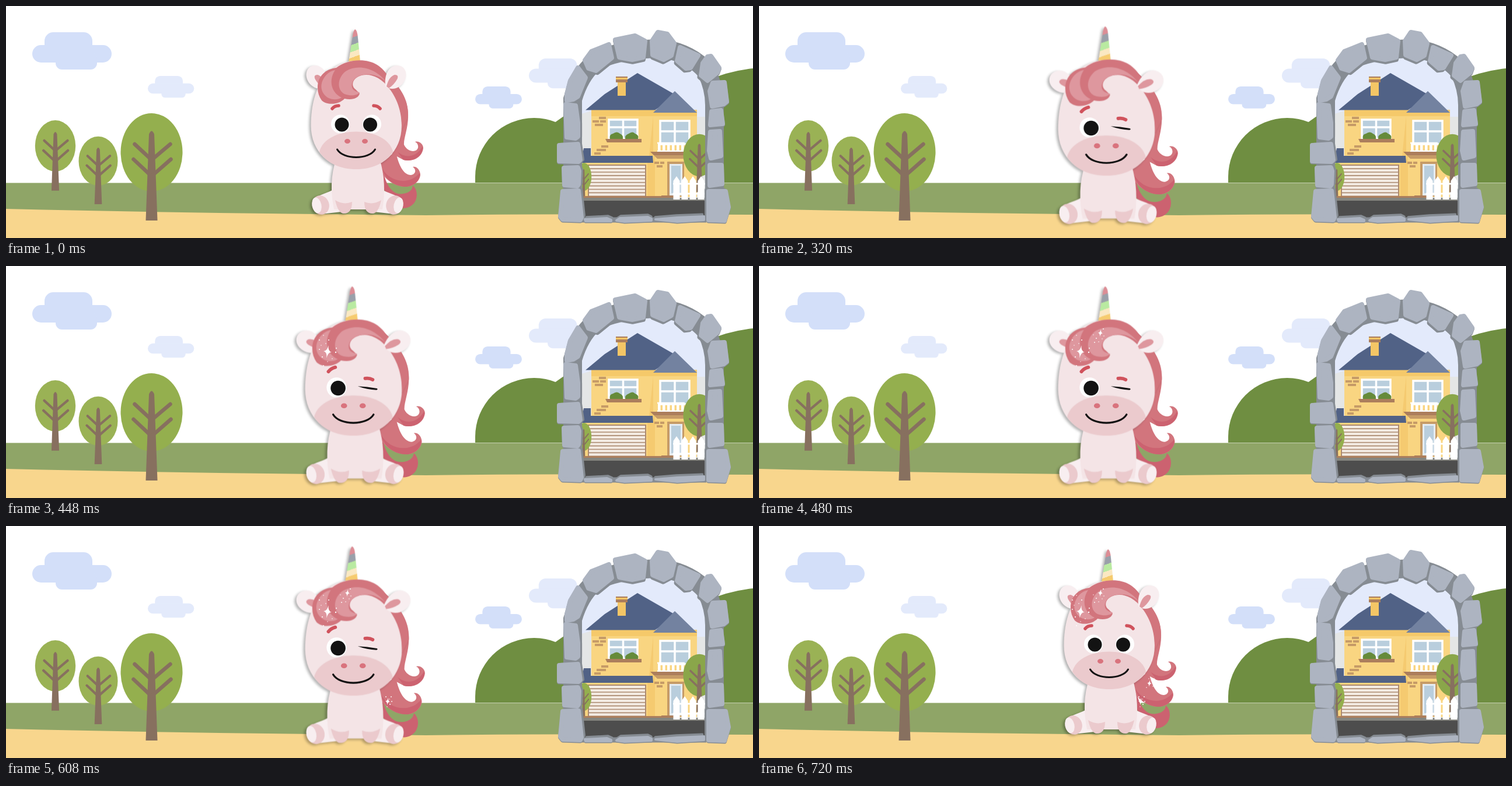
An HTML page that plays this animation: 1280 px wide and 398 px high, repeating every 0.76 s.

```html
<!DOCTYPE html>
<html lang="en">
<head>
<meta charset="utf-8">
<title>Winking unicorn</title>
<style>
  html, body { margin: 0; width: 100%; height: 100%; overflow: hidden; background: #fff; }
  svg { display: block; width: 100%; height: 100%; }
  #front { filter: drop-shadow(-2.5px 2px 2px rgba(0, 0, 0, .3)); }
  .skin { fill: #f4e4e6; }
  .pale { fill: #f8eef0; }
  .blush { fill: #ebcacd; }
  .hair { fill: #d2757d; }
  .hairLight { fill: #de979e; }
  .hairDark { fill: #cc6270; }
  .brow { fill: none; stroke: #d0525c; stroke-width: 5.5; stroke-linecap: round; }
  .roof { fill: #516286; }
  .brick { fill: #c69b67; }
  .wood { fill: #ac7e5c; }
  .glass { fill: #b9cedd; stroke: #fff; stroke-width: 3.5; }
  .stoneShade { fill: #868c93; stroke: #868c93; }
  #sparkles { fill: #fff; }
</style>
</head>
<body>
<svg viewBox="0 0 1280 398" preserveAspectRatio="none">
  <defs>
    <g id="cloud">
      <rect x="21" width="82" height="40" rx="15"/>
      <rect y="22" width="136" height="30" rx="15"/>
      <rect x="40" y="35" width="71" height="29" rx="11"/>
    </g>
    <g id="tree">
      <ellipse rx="53" ry="67"/>
      <path d="M-4.500-31Q0-42 4.500-31L10 117H-10Z" fill="#87705f"/>
      <path d="M-29-14L0 13L32-14M-31 12L0 41L33 12" fill="none" stroke="#87705f" stroke-width="6.500" stroke-linecap="round"/>
    </g>
    <g id="stones" stroke-width="8" stroke-linejoin="round">
      <path d="M1044 58L1078 51L1095 60L1092 88L1073 92L1051 88Z"/>
      <path d="M1107 60L1117 45L1133 48L1145 64L1140 85L1127 92L1108 84Z"/>
      <path d="M992 93L1003 78L1033 66L1038 89L1011 111L998 107Z"/>
      <path d="M1155 71L1186 85L1173 106L1165 107L1150 94Z"/>
      <path d="M1194 98L1202 87L1208 86L1222 106L1219 114L1202 128L1191 119Z"/>
      <path d="M961 151L967 128L980 106L993 123L980 155L972 160L961 162Z"/>
      <path d="M1206 146L1211 132L1231 131L1235 164L1230 168L1210 172Z"/>
      <path d="M959 169L976 171L980 200L980 224L976 227L961 225Z"/>
      <path d="M1209 181L1225 179L1228 202L1207 204Z"/>
      <path d="M1207 216L1223 215L1225 257L1208 261L1205 248Z"/>
      <path d="M948 239L980 237L984 264L981 267L948 266Z"/>
      <path d="M956 278L980 277L982 283L981 306L979 309L957 307Z"/>
      <path d="M1206 273L1226 273L1227 305L1206 308Z"/>
      <path d="M954 318L981 317L986 363L984 367L954 366L950 361Z"/>
      <path d="M1204 318L1233 318L1238 345L1231 368L1204 367Z"/>
      <g stroke-width="4">
        <path d="M992 366L1030 364L1037 367V369H993Z"/>
        <path d="M1046 368L1052 364L1100 362L1106 365V368L1060 370Z"/>
        <path d="M1113 366L1150 363L1196 361V367L1150 370Z"/>
      </g>
    </g>
    <path id="picket" d="M0 332V300L5.500 292L11 300V332Z" fill="#fff"/>
    <path id="star" d="M0-11Q.6-.6 7 0Q.6.6 0 11Q-.6.6-7 0Q-.6-.6 0-11Z"/>
    <g id="ear">
      <path class="pale" d="M650 138C648 118 655 103 670 102C684 102 689 116 683 128C677 140 662 147 650 138Z"/>
      <path class="hairLight" d="M652 138Q656 121 666 118Q674 118 670 126Q665 135 656 141Z"/>
    </g>
    <g id="limbs">
      <path class="pale" d="M562 314C552 321 537 323 530 330L540 357L575 353Z"/>
      <ellipse class="blush" cx="539" cy="341.500" rx="14.500" ry="16.500" transform="rotate(-18 539 341)"/>
      <ellipse class="pale" cx="532.500" cy="342" rx="8" ry="13.500" transform="rotate(-12 532 342)"/>
    </g>
    <path id="hoof" class="blush" d="M564 333Q578 342 593 336Q593 356 579 356Q569 356 564 333Z"/>
    <linearGradient id="stripes" gradientUnits="userSpaceOnUse" x1="592" y1="42" x2="609.800" y2="93">
      <stop offset=".222" stop-color="#dc8d95"/>
      <stop offset=".222" stop-color="#9aa0aa"/><stop offset=".433" stop-color="#9aa0aa"/>
      <stop offset=".433" stop-color="#b9eaa1"/><stop offset=".643" stop-color="#b9eaa1"/>
      <stop offset=".643" stop-color="#fae8c2"/><stop offset=".817" stop-color="#fae8c2"/>
      <stop offset=".817" stop-color="#f6cb6f"/>
    </linearGradient>
    <clipPath id="gate"><path d="M975 366V180C975 115 1025 80 1095 80S1212 115 1212 190V366Z"/></clipPath>
  </defs>

  <!-- Landscape -->
  <g fill="#d3dff9">
    <use href="#cloud" x="45" y="45"/>
    <use href="#cloud" transform="translate(804 138) scale(.588)"/>
  </g>
  <g fill="#e3eafb">
    <use href="#cloud" transform="translate(243 120) scale(.583)"/>
    <use href="#cloud" transform="translate(896 90) scale(.8)"/>
  </g>
  <g fill="#6f8e41">
    <path d="M804 303V293A101 101 0 0 1 1006 293V303Z"/>
    <path d="M920 303V216Q940 199 965 183V303ZM1195 303V130Q1238 111 1280 107V303Z"/>
  </g>
  <path d="M0 303.500H1280V398H0Z" fill="#8fa567"/>
  <path d="M0 348Q300 355 620 358L720 359Q900 356 1280 358V398H0Z" fill="#f8d68d"/>
  <g fill="#9ab255">
    <use href="#tree" transform="translate(84.500 240) scale(.655)"/>
    <use href="#tree" transform="translate(158 266) scale(.632)"/>
    <use href="#tree" transform="translate(249.500 251)" fill="#94af4e"/>
  </g>

  <!-- House behind the gate -->
  <g clip-path="url(#gate)">
    <path d="M970 75H1215V370H970Z" fill="#e3eafb"/>
    <path d="M970 190L1003 180V330H970ZM1184 190H1215V330H1184Z" fill="#e4e6e6"/>
    <path d="M1003 178H1184V328H990V262H1003Z" fill="#f9d581"/>
    <path d="M1003 178H1184V189H1003Z" fill="#f5c96a"/>
    <path d="M1109 189L1102 257H1112V328H1099V268H1109Z" fill="#f5ca70"/>
    <path class="roof" d="M993 178.500L1026 151L1082 115L1150 154L1112 178.500Z"/>
    <path d="M1109 183L1146 146L1184 183Z" fill="#7382a0"/>
    <path d="M1048 128H1062V154H1048Z" fill="#f4c666"/>
    <path class="wood" d="M1045 121H1065V131H1045Z"/>
    <path d="M1045 123H1065V126H1045Z" fill="#f4c666"/>
    <path class="brick" d="M1016 190h12v4h-12zM1005 196h11v4h-11zM1018 196h10v4h-10zM1009 202h14v4h-14zM1020 239h12v4h-12zM1012 245h16v4h-16zM1008 251h11v4h-11zM1111 267h8v4h-8zM1121 267h7v4h-7zM1115 273h10v4h-10z"/>
    <path class="roof" d="M985 269L990 244H1002V257H1108L1109 269Z"/>

    <path class="glass" d="M1033 195H1082V228H1033ZM1057.500 195V228M1033 208H1082"/>
    <path d="M1035 229Q1033 220 1040 219Q1047 214 1052 219Q1058 221 1057 229ZM1061 229Q1060 221 1067 219Q1074 214 1078 219Q1085 221 1083 229Z" fill="#668b3a"/>
    <path class="wood" d="M1027 228H1089V234H1030Z"/>
    <path class="glass" d="M1121 197H1171V237H1121ZM1146 197V237M1121 215H1171"/>
    <path d="M1116 235H1163M1116 249H1163" stroke="#fff" stroke-width="2.500"/>
    <path d="M1117 242H1163" stroke="#fff" stroke-width="14" stroke-dasharray="4.500 3.500"/>
    <path class="wood" d="M1104 250H1164V256H1110Z"/>
    <path class="brick" d="M1110 256H1164V262H1116Z"/>

    <path d="M997 272H1097V327H997Z" fill="#ac8a70"/>
    <path d="M1047 274V326" stroke="#f3ebe3" stroke-width="96" stroke-dasharray="4.300 1.600"/>
    <path class="brick" d="M1133 267H1162V327H1133Z"/>
    <path d="M1137 271H1159V325H1137Z" fill="#e6edf2"/>
    <path d="M1140 274H1156V321H1140Z" fill="#b9cedd"/>
    <use href="#tree" transform="translate(1188 256) scale(.52 .54)" fill="#8aa64a"/>
    <use href="#tree" transform="translate(990 293) scale(.25 .36)" fill="#94af4e"/>
    <path class="wood" d="M990 326H1145V329H990ZM1123 325H1148V333H1123Z"/>
    <path d="M985 329H1205V335H985Z" fill="#85857f"/>
    <path d="M985 334H1205V368H985Z" fill="#4d4d4d"/>
    <path d="M1143 305H1198M1143 322H1198" stroke="#fff" stroke-width="3"/>
    <use href="#picket" x="1143.500"/><use href="#picket" x="1157.500"/>
    <use href="#picket" x="1171.500"/><use href="#picket" x="1185.500"/>
  </g>
  <g class="stoneShade">
    <path d="M971 368V160Q985 112 1015 92Q1060 73 1126 73Q1175 82 1200 112Q1214 140 1214 170V368" fill="none" stroke-width="32"/>
    <path d="M985 367H1200" stroke-width="9"/>
    <use href="#stones" transform="translate(1095 230) scale(.972) translate(-1095 -230)"/>
    <use href="#stones" y="1.500"/>
  </g>
  <use href="#stones" fill="#adb4c1" stroke="#adb4c1"/>

  <g id="unicorn">
    <!-- Mane -->
    <path class="hairDark" d="M645 275C648 300 658 319 672 322C684 324 697 318 697 308C705 314 706 328 700 337C695 344 687 347 680 347C668 332 655 322 648 316Z"/>
    <path class="hair" d="M636 270L668 250C672 270 680 290 694 290C703 288 703 280 697 276C704 274 710 282 710 290C708 304 694 311 683 310C670 310 656 302 648 292Z"/>
    <path class="hairDark" d="M644 278C658 303 692 308 709 286C711 301 695 311 683 310C664 308 650 298 644 278Z"/>
    <path class="hair" d="M645 110C676 138 690 160 689 190C689 210 681 228 682 238C688 251 704 252 706 243C707 237 703 234 701 233C708 231 715 237 715 244C713 260 697 268 681 264L655 250Z"/>
    <path class="hairDark" d="M671 250C684 262 704 260 714 240C716 258 697 268 681 264Z"/>

    <g id="front">
      <use href="#limbs"/>
      <use href="#limbs" transform="matrix(-1 0 0 1 1205 0)"/>
      <path class="skin" d="M566 262C556 290 556 320 562 349H645C650 320 649 290 640 262Z"/>
      <use href="#hoof"/>
      <use href="#hoof" transform="matrix(-1 0 0 1 1207 0)"/>
      <path d="M598 40Q602 41 603 55L607 96H587L594 52Q595 42 598 40Z" fill="url(#stripes)"/>
      <g transform="matrix(-1 0 0 1 1200 0)"><use class="ear" href="#ear"/></g>
      <path class="skin" d="M600 94C645 94 678 135 678 205C678 250 645 280 600 280C555 280 522.500 250 522.500 205C522.500 135 555 94 600 94Z"/>
      <path class="blush" d="M537 250C548 204 652 204 663 250C650 270 627 280 600 280S550 270 537 250Z"/>
      <path class="hair" d="M645 110C676 138 690 160 689 190L678 212C679 180 669 156 654 138Z"/>
      <path class="hair" d="M534 140C534 120 548 108 566 106C585 91 617 89 636 101C652 111 662 130 658 143C640 118 618 114 604 121C592 127 592 138 599 143L606 150C604 158 594 162 580 159C572 168 552 172 541 162Q534 152 534 140Z"/>
      <path class="hairLight" d="M652 131C635 108 605 98 582 112C567 124 567 144 580 151C594 156 604 152 606 148C594 147 590 139 594 130C600 116 632 110 652 131Z"/>
      <path class="hairLight" d="M549 118C536 132 538 150 553 158C562 162 571 160 575 157C556 148 553 126 564 110Q556 111 549 118Z"/>
      <use class="ear" href="#ear"/>
    </g>

    <!-- Face -->
    <circle cx="573" cy="202.500" r="16" fill="#fff"/>
    <circle cx="575.500" cy="203.500" r="12" fill="#131313"/>
    <g id="openEye">
      <circle cx="627" cy="202.500" r="16" fill="#fff"/>
      <circle cx="624" cy="203.500" r="12" fill="#131313"/>
      <path class="brow" d="M559 176Q563 171 570 171M630 171Q637 171 641 176"/>
    </g>
    <g id="closedEye">
      <path d="M607 200.500Q622 201 638 204Q640 206 637 206.500Q622 206 607 200.500Z" fill="#131313"/>
      <path class="brow" d="M560 177Q564 172 571 170M619 188Q626 187 631 190"/>
    </g>
    <path d="M580 232a5 4 0 1 0 10 0a5 4 0 1 0-10 0M610 232a5 4 0 1 0 10 0a5 4 0 1 0-10 0" fill="#d9737d"/>
    <path d="M567.500 246C578 264 622 264 632.500 246" fill="none" stroke="#111" stroke-width="3" stroke-linecap="round"/>
  </g>
  <g id="sparkles"></g>
</svg>

<script>
  const LOOP = 760, WINK_START = 320, WINK_END = 720, SPARKLE_START = 400, SPARKLE_STEP = 80;

  // Each cluster: a star (x, y, scale) and dots placed relative to it (dx, dy, r).
  const clusters = [
    { star: [551, 147, 1], dots: [[-14, -20, .9], [-7, -28, .8], [2, -20, 1], [-14, -4, .9], [-9, 9, 1], [-3, -14, .8],
                                [15, -6, 1], [8, 12, .8], [-7, 24, .9], [14, 1, 1.2], [-11, -11, .7], [0, 17, .7]] },
    { star: [585, 115, .6], dots: [[-7, 9, .9], [5, -7, .9], [-3, 15, .8], [-10, 16, .9], [6, 5, .8], [-12, 3, .7], [3, 10, .7]] },
    { star: [654, 301, .6], dots: [[-3, -8, .9], [6, -8, .9], [4, 5, 1], [-1, 9, .7], [7, 0, .9], [3, -4, .7]] },
    { star: [669, 270, .55], dots: [[8, -8, .8], [4, -6, .7], [-5, 7, .8], [6, 5, .8], [-1, -8, .7]] }
  ];

  const byId = id => document.getElementById(id);
  const show = (node, on) => node.setAttribute("visibility", on ? "visible" : "hidden");

  byId("sparkles").innerHTML = clusters.map(({ star: [x, y, scale], dots }) =>
    `<g transform="translate(${x} ${y})"><use href="#star" transform="rotate(8) scale(${scale})"/>` +
    dots.map(([dx, dy, r]) => `<circle cx="${dx}" cy="${dy}" r="${r}"/>`).join("") + "</g>").join("");

  const sparkles = [...byId("sparkles").children];
  const ears = document.querySelectorAll(".ear");

  function draw() {
    const time = performance.now() % LOOP;
    const winking = time >= WINK_START && time < WINK_END;
    byId("unicorn").setAttribute("transform", winking ? "translate(-45 -7.700) scale(1.067)" : "");
    ears.forEach(ear => ear.setAttribute("transform", winking ? "rotate(28 655 134)" : ""));
    show(byId("openEye"), !winking);
    show(byId("closedEye"), winking);
    sparkles.forEach((cluster, i) => show(cluster, time >= SPARKLE_START + i * SPARKLE_STEP));
    requestAnimationFrame(draw);
  }
  draw();
</script>
</body>
</html>
```
